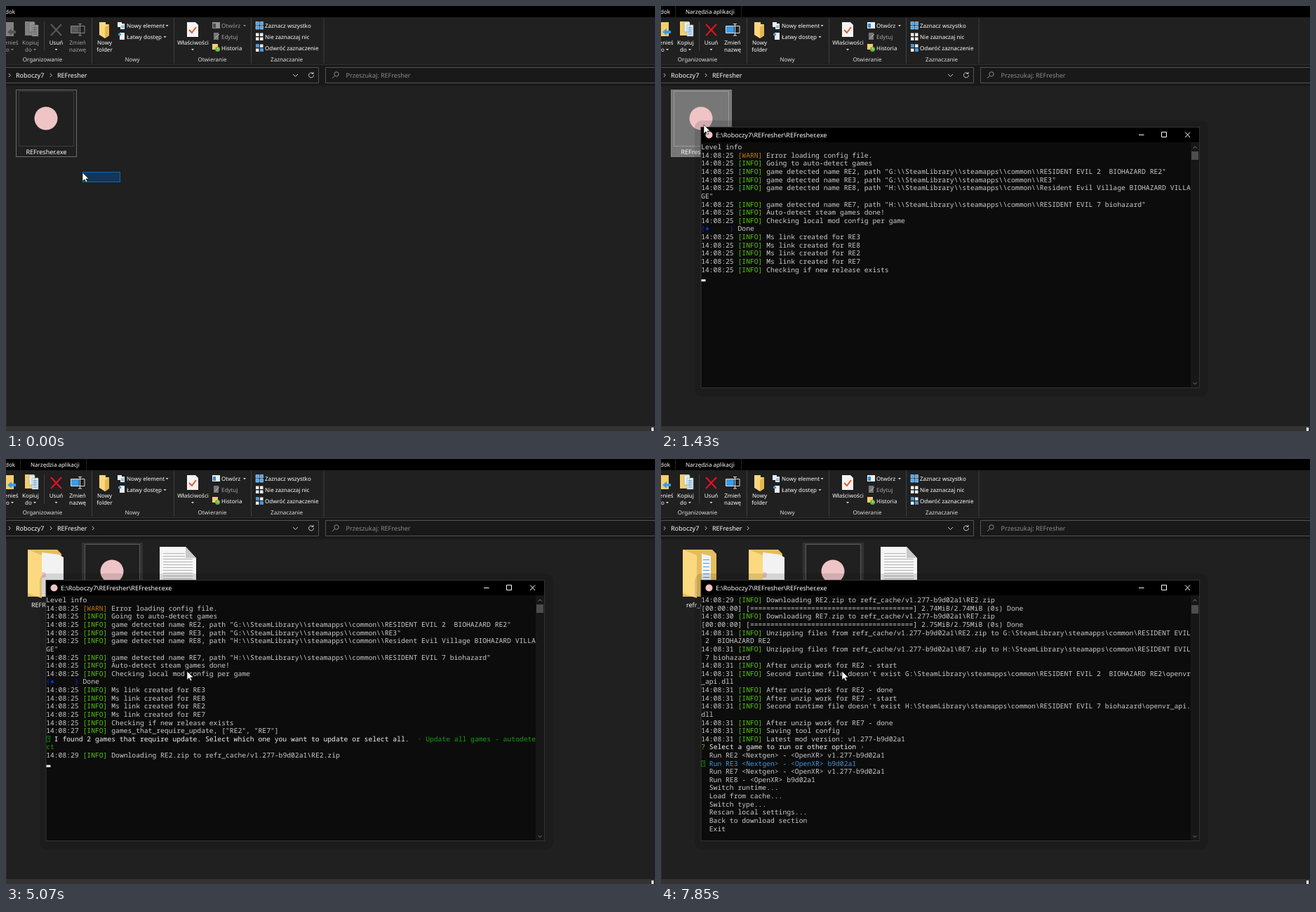
Recreate the animation shown at these times as an HTML page. Size 925 by 605 pixels, loop 8 s.

```html
<!DOCTYPE html>
<html lang="pl">
<head>
<meta charset="utf-8">
<title>REFresher</title>
<style>
html, body { margin: 0; width: 100%; height: 100%; overflow: hidden; background: #202020; }
svg { display: block; width: 925px; height: 605px; }
text { font: 8px "Noto Sans", "Open Sans", sans-serif; fill: #fff; white-space: pre; text-rendering: geometricPrecision; }
.mid text, .mid { text-anchor: middle; }
.big text, .big { font-size: 9px; }
.mono { font: 9.695px "Noto Sans Mono", "DejaVu Sans Mono", monospace; }
.line { fill: none; stroke: #ccc; }
.cross { stroke: #e81123; stroke-width: 2; }
.off .tool { filter: grayscale(1) brightness(.62); }
.off .tab { display: none; }
.off .cross { stroke: #5a5a5a; }
</style>
</head>
<body>
<svg id="stage" viewBox="0 0 925 605">
  <defs>
    <path id="down" d="M-2-1h4l-2 2.2z" fill="#ddd"/>
    <path id="next" class="line" d="M-1.2-2.5 1.3 0-1.2 2.5"/>
    <path id="grid" d="M0 0h4.5v4.5h-4.5zM6 0h4.5v4.5h-4.5zM0 6h4.5v4.5h-4.5zM6 6h4.5v4.5h-4.5z"/>
  </defs>
  <rect width="925" height="605" fill="#202020"/>
  <rect width="925" height="16" fill="#000"/>
  <rect y="84" width="925" height="30" fill="#191919"/>
  <path class="line" style="stroke:#2d2d2d" d="M0 83.5H925M.5 114V598"/>
  <path class="line" style="stroke:#3f3f3f" d="M54.5 22V64M122.5 17V82M239.5 17V82M349.5 17V82M453 17V82"/>
  <text x="-1" y="11">dok</text>
  <g class="tab">
    <path class="line" style="stroke:#222" d="M20.5 0V16M114.5 0V16"/>
    <text x="35" y="11">Narzędzia aplikacji</text>
  </g>

  <g class="tool">
    <path fill="#f5cf6b" d="M-2 23H11V43H-2z"/>
    <path fill="#3a9bea" d="M2 37l6-5v3h6v4h-6v3z"/>
    <text x="17.5" y="55" text-anchor="end">Przenieś</text><text x="0" y="64.5">o</text>
    <use href="#down" x="9" y="62"/>
    <path fill="#f5cf6b" d="M27 22h13v20h-13z"/>
    <path fill="#e8eef5" stroke="#8aa" stroke-width=".6" d="M33 23h8v14h-8zM37 27h9v16h-9z"/>
    <path stroke="#4a90d9" d="M38.5 31h6M38.5 34h6M38.5 37h6M38.5 40h6"/>
    <g class="mid"><text x="35" y="55">Kopiuj</text><text x="32" y="64.5">do</text></g>
    <use href="#down" x="41" y="62"/>
    <path fill="#3a9bea" d="M92 29h12v9h-12z"/>
    <path class="line" style="stroke:#ddd" d="M92.5 28.5H112V38.5H92.5zM105.5 25.5V42M103 25.5h5M103 42h5"/>
    <g class="mid"><text x="102" y="55">Zmień</text><text x="102" y="64.5">nazwę</text></g>
    <path fill="#eee" d="M294 23h11v9h-11z"/><path fill="#2f8ce0" d="M295 25h4v6h-4z"/>
    <text x="307" y="30.5">Otwórz</text><use href="#down" x="340" y="28"/>
  </g>
  <path class="cross" d="M64 26l15 16M79 26L64 42"/>
  <use href="#down" x="71.5" y="62"/>
  <path fill="#fcd77f" d="M133 23h9v3h5v16l-6 4-8-5z"/><path fill="#e5b84e" d="M141 30l6-4v16l-6 4z"/>
  <path fill="#e8eef5" d="M159 23h6v7h-6zM163 25h6v8h-6zM162 38h7v10h-7z"/>
  <path fill="#3a9bea" d="M164 28h4v1h-4zM164 30h4v1h-4zM160 39h4v3h-4z"/>
  <path fill="#f4f4f4" d="M258 23h12l4 4v17h-16z"/>
  <path class="line" style="stroke:#e8562a;stroke-width:2" d="M261 34l4 4 6-8"/>
  <use href="#down" x="266" y="62"/><use href="#down" x="229.5" y="28"/><use href="#down" x="226.5" y="44"/>
  <path fill="#777" d="M296 38h7v10h-7z"/><path stroke="#bbb" d="M298 46l6-6"/>
  <path fill="#f5cf6b" d="M294 54h8v8h-8z"/><circle cx="301.5" cy="61.5" r="3.5" fill="#68b83b"/>
  <path class="line" d="M301.5 59v2.5h2"/>
  <g class="mid">
    <text x="71.5" y="55">Usuń</text>
    <text x="140.5" y="55">Nowy</text><text x="140.5" y="64.5">folder</text>
    <text x="266.5" y="55">Właściwości</text>
    <g opacity=".85">
      <text x="52" y="79">Organizowanie</text><text x="180" y="79">Nowy</text>
      <text x="294" y="79">Otwieranie</text><text x="400" y="79">Zaznaczanie</text>
    </g>
  </g>
  <text x="172" y="30.5">Nowy element</text><text x="172" y="46.5">Łatwy dostęp</text>
  <text x="307" y="46.5" opacity=".6">Edytuj</text><text x="307" y="62.5">Historia</text>
  <use href="#grid" x="356" y="22.5" fill="#4aa8f0" stroke="#bfe0ff" stroke-width=".6"/>
  <use href="#grid" x="356" y="38.5" fill="#eee"/>
  <use href="#grid" x="356" y="54.5" fill="#eee"/>
  <path fill="#3a9bea" d="M356 54.5h4.5v4.5h-4.5zM362 60.5h4.5v4.5h-4.5z"/>
  <text x="369" y="30.5">Zaznacz wszystko</text>
  <text x="369" y="46.5">Nie zaznaczaj nic</text>
  <text x="369" y="62.5">Odwróć zaznaczenie</text>

  <path class="line" style="stroke:#535353" d="M-5 87.5H445.5V109.5H-5M930 87.5H455.5V109.5H930"/>
  <g class="big">
    <text x="14" y="101.5">Roboczy7</text><text x="73" y="101.5">REFresher</text>
    <text x="484.5" y="102" style="fill:#8c8c8c">Przeszukaj: REFresher</text>
  </g>
  <use href="#next" x="5" y="98.5"/><use href="#next" x="64" y="98.5"/>
  <path class="line" d="M409 97l3.5 3.5L416 97M437.5 96a3.5 3.5 0 1 0 1 2.5M438 94v2.5h-2.5"/>
  <g class="line" style="stroke:#8c8c8c"><circle cx="471" cy="97" r="3.2"/><path d="M468.5 99.5L465 103"/></g>
  <rect y="598" width="925" height="7" fill="#333"/>
  <path fill="#fff" d="M920 600h3v5h-3z"/>
  <g id="live"></g>
</svg>
<script>
const LOOP = 8000, COLS = 120, CW = 5.817, LH = 11.62;
const LIME = '#55c814', AMBER = '#c07c0a', GREEN = '#13a10e', YELLOW = '#c19c00',
      CYAN = '#3a96dd', BLUE = '#0037da', WHITE = '#f2f2f2', GREY = '#8a8a8a';
const stage = document.getElementById('stage'), live = document.getElementById('live');

const esc = s => s.replace(/&/g, '&amp;').replace(/</g, '&lt;');
const lib = drive => drive + ':\\SteamLibrary\\steamapps\\common\\';
const count = (times, t) => times.filter(x => t >= x).length;

// Console lines are lists of [text, colour] parts.
const info = (s, sec = 25) => [[`14:08:${sec} `], ['[INFO]', LIME], [' ' + s]];
const found = (name, drive, dir) =>
  info(`game detected name ${name}, path "${(lib(drive) + dir).replace(/\\/g, '$&$&')}"`);

const RE2 = 'RESIDENT EVIL 2  BIOHAZARD RE2', RE7 = 'RESIDENT EVIL 7 biohazard';
const VER = 'v1.277-b9d02a1';
const boot = [
  [['Level info']],
  [['14:08:25 '], ['[WARN]', AMBER], [' Error loading config file.']],
  info('Going to auto-detect games'),
  found('RE2', 'G', RE2),
  found('RE3', 'G', 'RE3'),
  found('RE8', 'H', 'Resident Evil Village BIOHAZARD VILLAGE'),
  found('RE7', 'H', RE7),
  info('Auto-detect steam games done!'),
  info('Checking local mod config per game'),
];
const zip = name => `refr_cache/${VER}\\${name}.zip`;
const download = (name, sec) => info(`Downloading ${name}.zip to ${zip(name)}`, sec);
const unzip = (name, path) => info(`Unzipping files from ${zip(name)} to ${path}`, 31);
const after = (name, path) => [
  info(`After unzip work for ${name} - start`, 31),
  info(`Second runtime file doesn't exist ${path}\\openvr_api.dll`, 31),
  info(`After unzip work for ${name} - done`, 31),
];

const question = 'I found 2 games that require update. Select which one you want to update or select all.';
const all = 'Update all games - autodetect';
const note = '      info(your current version of mod is nextgen -> it will switch to standard)';
const updates = [all, 'RE2 Nextgen version', 'RE7 Nextgen version',
  'RE2 Standard version' + note, 'RE7 Standard version' + note, 'Skip'];
const runs = [`Run RE2 <Nextgen> - <OpenXR> ${VER}`, 'Run RE3 <Nextgen> - <OpenXR> b9d02a1',
  `Run RE7 <Nextgen> - <OpenXR> ${VER}`, 'Run RE8 - <OpenXR> b9d02a1',
  'Switch runtime...', 'Load from cache...', 'Switch type...',
  'Rescan local settings...', 'Back to download section', 'Exit'];

const ask = (s, gap) => [['? ', YELLOW], [s, WHITE], [gap + '›', GREY]];
const menu = (items, sel) => items.map((s, i) =>
  i === sel ? [['⍰', GREEN], [' ' + s, CYAN]] : [['  ' + s]]);

function bar(times, total, t) {
  const i = count(times, t) - 1;
  const n = [0, 7, 21, 40, 40][i];
  const size = ['8.00KiB', '512.00KiB', '1.45MiB', total, total][i];
  const fill = '='.repeat(n) + (n < 40 ? '>' + '-'.repeat(39 - n) : '');
  return [[`[00:00:00] [${fill}] ${size}/${total} (0s)${i > 3 ? ' Done' : ''}`]];
}

function log(t) {
  const out = [...boot];
  const add = (time, ...lines) => t >= time && out.push(...lines);
  if (t < 1190) return [...out, [['⍰']]];
  add(1190, [['(●     )', BLUE], [' Done']]);
  add(1310, ...['RE3', 'RE8', 'RE2', 'RE7'].map(n => info('Ms link created for ' + n)));
  add(1430, info('Checking if new release exists'));
  add(2650, info('games_that_require_update, ["RE2", "RE7"]', 27));
  if (t < 5070) {
    const sel = [0, 1, 2, 1, 0][count([3490, 3890, 4140, 4570], t)];
    add(2650, ask(question, '  '), ...menu(updates, sel));
    return out;
  }
  add(5070, [['⍰ ', GREEN], [question, WHITE], ['  · ' + all, GREEN]], download('RE2', 29));
  if (t >= 5630) out.push(bar([5630, 5780, 5900, 6020, 6170], '2.74MiB', t));
  add(6170, download('RE7', 30));
  if (t >= 6720) out.push(bar([6720, 6840, 6960, 6960, 7110], '2.75MiB', t));
  add(7110, unzip('RE2', lib('G') + RE2), unzip('RE7', lib('H') + RE7));
  add(7230, ...after('RE2', lib('G') + RE2), ...after('RE7', lib('H') + RE7),
    info('Saving tool config', 31), info('Latest mod version: ' + VER, 31),
    ask('Select a game to run or other option', ' '), ...menu(runs, t < 7850 ? 0 : 1));
  return out;
}

function wrap(lines) {
  const rows = [];
  for (const line of lines) {
    let row = [], col = 0;
    for (let [s, colour = '#ccc'] of line) {
      while (s) {
        if (col === COLS) { rows.push(row); row = []; col = 0; }
        const part = s.slice(0, COLS - col);
        row.push([col, part, colour]);
        col += part.length;
        s = s.slice(part.length);
      }
    }
    rows.push(row);
  }
  return rows;
}

function terminal(t) {
  const scroll = t >= 7230 ? 19 : 0;
  const rows = wrap(log(t)).slice(scroll);
  const caret = t < 1980 || (t >= 5070 && t < 7230);
  const text = rows.map((row, r) => row.map(([col, s, c]) =>
    `<text class="mono" x="${57.2 + col * CW}" y="${Math.round(204.2 + r * LH)}" style="fill:${c}">${esc(s)}</text>`
  ).join('')).join('');
  return `<rect x="48" y="163" width="732" height="393" rx="10" opacity=".12"/>
    <rect x="57" y="172.5" width="710.5" height="371" fill="#0c0c0c" stroke="#333"/>
    <rect x="57.5" y="173" width="709.5" height="21" fill="#000"/>
    <circle cx="68.5" cy="183.5" r="5" fill="#efc4c6"/>
    <text class="big" x="78" y="187">E:\\Roboczy7\\REFresher\\REFresher.exe</text>
    <path class="line" style="stroke:#fff" d="M681 183.5h7.5M713.5 179.5h7v7h-7zM747 179.5l7 7.5M754 179.5l-7 7.5"/>
    <rect x="755" y="194" width="12" height="349" fill="#171717"/>
    <rect x="756" y="${scroll ? 208 : 207}" width="10" height="12" fill="#4d4d4d"/>
    <path class="line" style="stroke:#777" d="M758.5 202.5l2.5-2.5 2.5 2.5M758.5 536l2.5 2.5 2.5-2.5"/>
    ${text}${caret ? `<rect x="57.5" y="${203.2 + rows.length * LH}" width="6" height="3" fill="#f2f2f2"/>` : ''}`;
}

// File icons are drawn around x = 0.
function folder(label, page) {
  return `<path fill="#e5bd5c" d="M-26 129H16L22 135V196H-26z"/>${page}
    <path fill="#fcd980" d="M-26 129L-6 137V198L-26 191z"/>
    <text class="big" x="-21" y="210.5">${label}</text>`;
}
const icons = {
  dir: () => folder('REFR', '<path fill="#f2f2f2" d="M-6 133L18 136 25 140V196H-6z"/><circle cx="-4" cy="165" r="4" fill="#efc4c6"/>'),
  cache: () => folder('refr_cache', '<path fill="#eef3f8" d="M1 135L14 138V196H1z"/><path stroke="#5b9bd5" d="M3 143.5h9M3 148.5h9M3 153.5h9M3 158.5h9M3 163.5h9M3 168.5h9"/>'),
  txt: () => {
    const lines = Array.from({ length: 12 }, (_, i) => `M-21 ${134.5 + i * 4}H${i < 2 ? 10 : 21}`).join('');
    return `<path fill="#f6f6f6" d="M-26 125H11L26 141V196H-26z"/><path fill="#c9c9c9" d="M11 125V141H26z"/>
      <path stroke="#b5b5b5" d="${lines}"/>`;
  },
  exe: t => {
    const fill = t < 240 ? 'none' : t < 760 ? '#4d4d4d' : t < 1860 ? '#777' : '#333';
    const edge = t < 760 ? '#6b6b6b' : t < 1860 ? '#858585' : '#333';
    const inner = t < 240 ? '#3c3c3c' : t < 1860 ? '#999' : '#5a5a5a';
    return `<rect x="-42.5" y="119.5" width="86" height="95" fill="${fill}" stroke="${edge}"/>
      <rect x="-38.5" y="121.5" width="78" height="78" fill="${t < 1860 ? 'none' : '#202020'}" stroke="${inner}"/>
      <circle cy="160" r="16.5" fill="#efc4c6"/>
      <text class="big mid" x=".5" y="210.5">REFresher.exe</text>`;
  },
};
const orders = ['exe', 'exe dir txt', 'dir exe txt', 'dir exe txt cache', 'cache dir exe txt'];

const path = [[0, 109, 237], [120, 100, 224], [240, 86, 203], [360, 71, 183], [480, 61, 169],
  [1860, 74, 179], [1980, 118, 211], [2100, 178, 249], [2220, 232, 286], [2370, 258, 302]];

function draw(t) {
  const names = orders[count([2220, 2650, 5900, 6440], t)].split(' ');
  const [, x, y] = path[count(path.map(p => p[0]), t) - 1];
  return names.map((n, i) => `<g transform="translate(${57 + 94 * i})">${icons[n](t)}</g>`).join('')
    + (t >= 2370 ? '<use href="#next" x="124" y="98.5"/>' : '')
    + (t < 120 ? '<rect x="109.5" y="236.5" width="53" height="14" fill="#12365a" stroke="#0f63b4"/>' : '')
    + (t >= 1040 ? terminal(t) : '')
    + `<path transform="translate(${x} ${y})" fill="#fff" stroke="#000" stroke-width=".6" d="M0 0V12.5L3 9.8 5 14 7 13 5 9H9z"/>`;
}

let last;
function tick(now) {
  const t = now % LOOP, markup = draw(t);
  stage.classList.toggle('off', t < 760);
  if (markup !== last) live.innerHTML = last = markup;
  requestAnimationFrame(tick);
}
tick(0);
</script>
</body>
</html>
```
